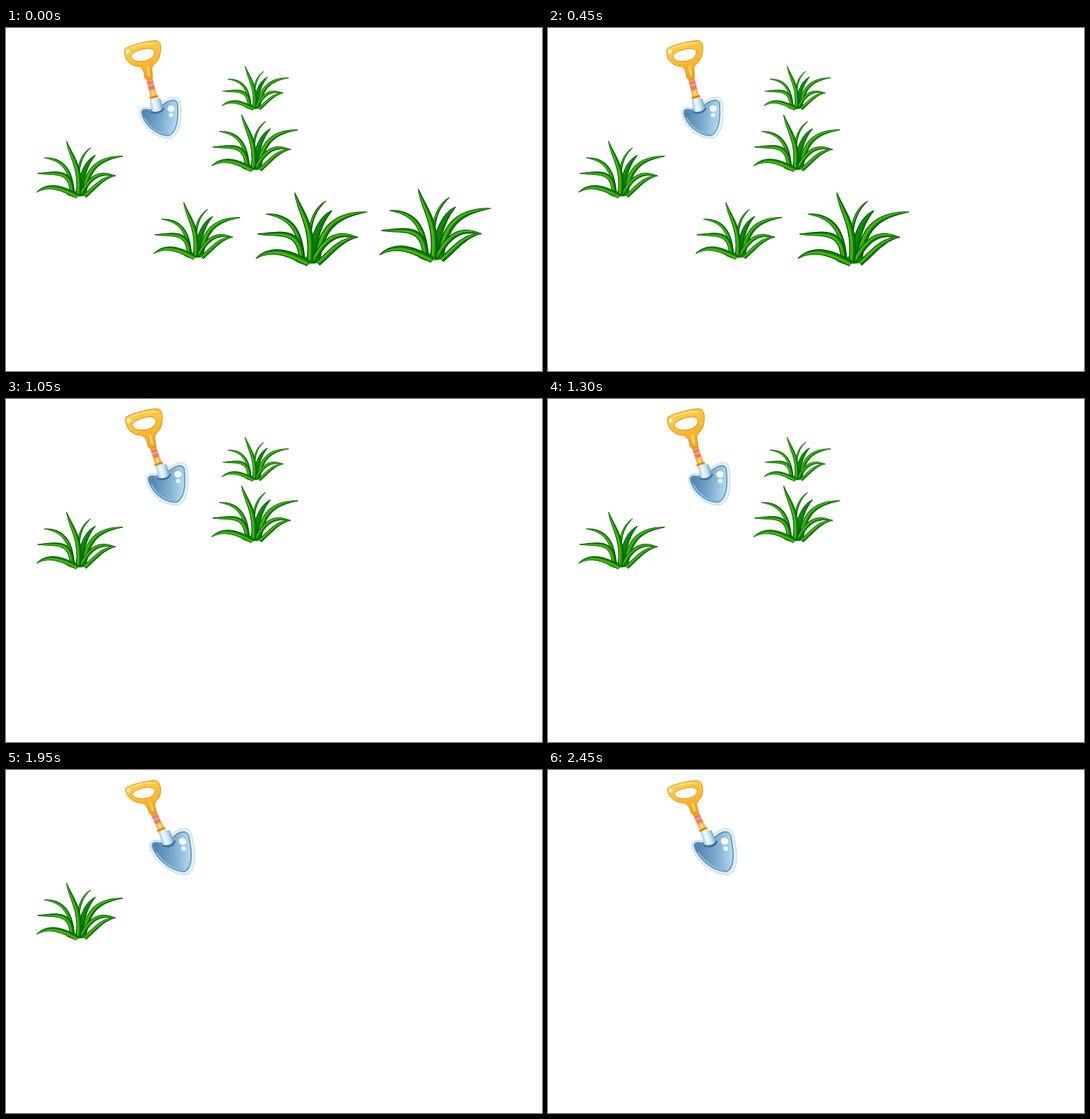
These frames come from a looping animation (750x481 px, 2.8 s). An HTML page with a canvas:

```html
<!DOCTYPE html>
<html lang="en">
<head>
<meta charset="utf-8">
<title>Shovel and grass</title>
<style>
html, body { margin: 0; width: 100%; height: 100%; overflow: hidden; background: #fff; }
canvas { display: block; width: 750px; height: 481px; }
</style>
</head>
<body>
<canvas id="stage" width="750" height="481"></canvas>
<script>
const ctx = document.getElementById('stage').getContext('2d');
const LOOP = 2800;

// x, y, scale, time of removal
const clumps = [
  [301.5, 53, 0.603, 1950],
  [287, 121, 0.778, 1450],
  [42, 158, 0.778, 2450],
  [206, 244, 0.778, 1050],
  [349, 230, 1, 700],
  [522, 225, 1, 250]
];

// tip, two control points, root, width; back to front
const blades = [
  [98, 13, 84, 24, 78, 38, 76, 60, 4],
  [107, 26, 90, 40, 84, 58, 76, 98, 11],
  [15, 31, 42, 33, 62, 45, 66, 92, 7],
  [156, 28, 112, 32, 92, 50, 86, 97, 10],
  [143, 64, 118, 56, 100, 60, 80, 98, 8],
  [3, 59, 36, 60, 64, 50, 65, 98, 9],
  [55, 1, 64, 32, 82, 48, 76, 98, 10],
  [143, 63, 120, 66, 108, 82, 88, 100, 8],
  [1, 93, 24, 76, 48, 86, 74, 100, 10]
];

// three anchors each for grip and blade, and the two ends of the shaft
const poses = {
  low: {
    grip: [166, 30, 213, 18, 200, 70],
    blade: [187, 116, 230, 155, 240, 97],
    shaft: [200, 69, 208, 101]
  },
  mid: {
    grip: [167, 27, 214, 14, 205, 67],
    blade: [196, 110, 241, 149, 249, 89],
    shaft: [205, 66, 215, 95]
  },
  high: {
    grip: [167, 26, 211, 15, 206, 60],
    blade: [201, 104, 253, 147, 254, 82],
    shaft: [206, 59, 219, 87]
  }
};

const steps = [
  [0, 'low'], [100, 'mid'], [250, 'high'],
  [450, 'low'], [550, 'mid'], [700, 'high'],
  [950, 'low'], [1050, 'mid'], [1200, 'low'], [1300, 'mid'], [1450, 'high'],
  [1700, 'low'], [1800, 'mid'], [1950, 'high'],
  [2200, 'low'], [2300, 'mid'], [2450, 'high']
];

function bezier(a, b, c, d, t) {
  const u = 1 - t;
  return u * u * u * a + 3 * u * u * t * b + 3 * u * t * t * c + t * t * t * d;
}

function bladeShape([x0, y0, x1, y1, x2, y2, x3, y3, w], from, to) {
  const N = 24, left = [], right = [];
  for (let i = 0; i <= N; i++) {
    const t = i / N, e = 0.01;
    const x = bezier(x0, x1, x2, x3, t), y = bezier(y0, y1, y2, y3, t);
    const dx = bezier(x0, x1, x2, x3, t + e) - x;
    const dy = bezier(y0, y1, y2, y3, t + e) - y;
    const k = w * 1.75 * Math.pow(t, 0.8) * (1 - 0.55 * t) / Math.hypot(dx, dy);
    left.push([x - dy * k * from, y + dx * k * from]);
    right.unshift([x - dy * k * to, y + dx * k * to]);
  }
  const path = new Path2D();
  left.concat(right).forEach(([x, y]) => path.lineTo(x, y));
  path.closePath();
  return path;
}

const shapes = blades.map(b => ({
  body: bladeShape(b, -0.5, 0.5),
  light: bladeShape(b, -0.08, 0.4)
}));
const root = new Path2D('M54 96 Q66 90 76 90 L95 92 Q91 100 86 100 L70 102 Q60 101 54 96Z');

function paint(path, fill, line, width) {
  if (fill) { ctx.fillStyle = fill; ctx.fill(path); }
  if (line) { ctx.strokeStyle = line; ctx.lineWidth = width; ctx.stroke(path); }
}

function spot(x, y, rx, ry, color, turn = 0) {
  ctx.fillStyle = color;
  ctx.beginPath();
  ctx.ellipse(x, y, rx, ry, turn, 0, Math.PI * 2);
  ctx.fill();
}

function drawClump(x, y, s) {
  ctx.setTransform(s, 0, 0, s, x, y);
  ctx.lineJoin = 'round';
  paint(root, '#3fae08');
  shapes.forEach(({ body, light }, i) => {
    if (i === 6) spot(70.5, 68, 2, 8, '#fff');
    paint(body, '#078007', '#034d05', 1.2);
    paint(light, i === 1 ? '#0c8c0a' : '#46b507');
  });
}

// affine map taking one triangle onto another
function fit(a, b) {
  const [ux, uy, vx, vy] = [a[2] - a[0], a[3] - a[1], a[4] - a[0], a[5] - a[1]];
  const det = ux * vy - uy * vx;
  const axis = k => {
    const p = b[2 + k] - b[k], q = b[4 + k] - b[k];
    const m = (p * vy - q * uy) / det, n = (q * ux - p * vx) / det;
    return [m, n, b[k] - m * a[0] - n * a[1]];
  };
  const [m, n, e] = axis(0), [p, q, f] = axis(1);
  ctx.setTransform(m, p, n, q, e, f);
}

function gradient(x0, y0, x1, y1, ...colors) {
  const g = ctx.createLinearGradient(x0, y0, x1, y1);
  colors.forEach((c, i) => g.addColorStop(i / (colors.length - 1), c));
  return g;
}

const hole = 'M175 40 C174 33 200 25 207 31 C210 37 204 44 195 46 C184 48 176 46 175 40Z';
const grip = new Path2D('M166 31 C166 25 205 16 212 18 C217 20 218 29 215 39 ' +
  'C213 48 206 50 204 56 L205 70 Q199 74 194 70 C194 62 191 56 187 54 ' +
  'C176 54 165 46 166 31Z ' + hole);
const spade = new Path2D('M201 112 C193 110 187 112 187 118 C188 134 205 154 229 155 ' +
  'C242 152 247 132 244 104 C242 94 230 96 220 103Z');
const inner = new Path2D('M201 115 C194 113 190 114 190 119 C193 134 208 150 227 151 ' +
  'C238 148 242 130 240 106 C238 99 229 100 219 108Z');
const socket = new Path2D('M201 101 Q208 97 216 99 L220 112 Q214 119 204 117Z');

function drawShaft([x0, y0, x1, y1]) {
  ctx.setTransform(1, 0, 0, 1, 0, 0);
  const part = (a, b, color, w) => {
    ctx.strokeStyle = color;
    ctx.lineWidth = w;
    ctx.beginPath();
    ctx.moveTo(x0 + (x1 - x0) * a, y0 + (y1 - y0) * a);
    ctx.lineTo(x0 + (x1 - x0) * b, y0 + (y1 - y0) * b);
    ctx.stroke();
  };
  part(0, 0.2, '#f2a62a', 9);
  part(0.18, 0.56, '#ec7a68', 9);
  part(0.3, 0.38, '#f8a48c', 9);
  part(0.56, 0.82, '#f4b53a', 9.5);
  part(0.6, 0.8, '#ffe06a', 4);
  part(0.82, 0.92, '#d98218', 12);
  part(0.92, 1, '#fbe3b0', 13);
}

function drawShovel(pose) {
  const base = poses.low;
  drawShaft(pose.shaft);

  fit(base.blade, pose.blade);
  paint(spade, '#e4f2f8', '#b9cbd6', 0.8);
  paint(inner, gradient(196, 122, 240, 128, '#5588b2', '#7eacd0', '#b4dcee'), '#5f97bd', 1.6);
  paint(new Path2D('M194 126 C201 139 212 148 226 149'), null, '#87b9d8', 2);
  paint(new Path2D('M203 118 Q216 122 221 112'), null, '#3d719d', 2.5);
  paint(socket, gradient(201, 108, 219, 104, '#8dbdd8', '#f4fbff', '#c0e0ef', '#5c95bd'));
  spot(231, 113, 5, 4.5, '#f4fcff');
  spot(231, 122, 3.2, 3, '#e6f5fb');

  fit(base.grip, pose.grip);
  ctx.fillStyle = gradient(180, 20, 200, 68, '#ffd04a', '#ffbd35', '#f5a322');
  ctx.fill(grip, 'evenodd');
  paint(grip, null, '#dc8c1c', 1);
  paint(new Path2D('M174 28 Q193 20 209 22'), null, '#ffe17a', 2.2);
  paint(new Path2D('M198 53 L200 67'), null, '#ffd768', 3);
  spot(170.5, 33, 2.6, 3.4, '#fff3cf', 0.3);
}

function frame(now) {
  const t = now % LOOP;
  ctx.setTransform(1, 0, 0, 1, 0, 0);
  ctx.fillStyle = '#fff';
  ctx.fillRect(0, 0, 750, 481);
  for (const [x, y, s, gone] of clumps) if (t < gone) drawClump(x, y, s);
  const step = steps.filter(([at]) => at <= t).pop();
  drawShovel(poses[step[1]]);
}

const start = performance.now();
function tick() {
  frame(performance.now() - start);
  requestAnimationFrame(tick);
}
tick();
</script>
</body>
</html>
```
